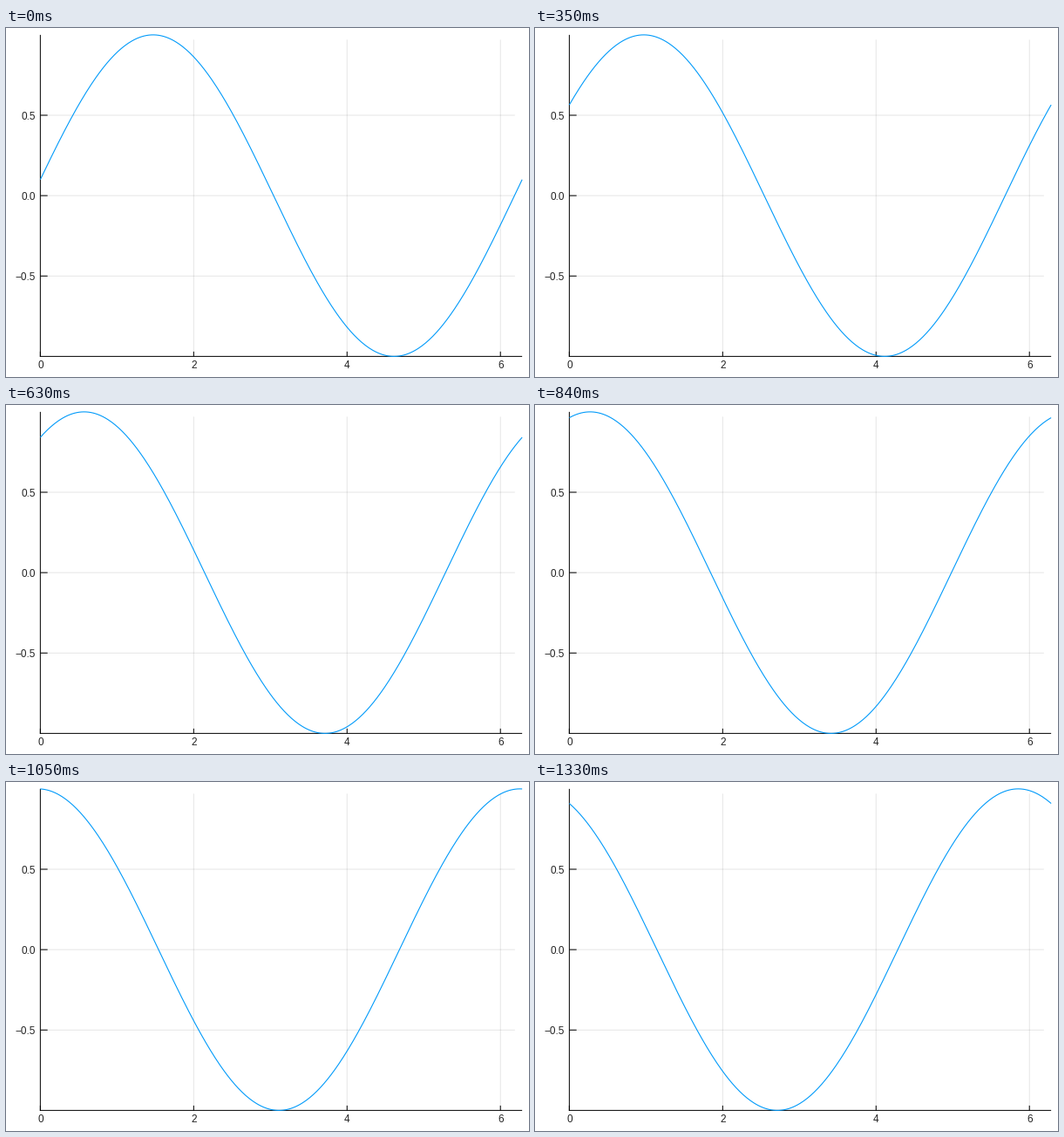
A matplotlib script for the animation above (1.4 s loop, 600 px wide and 400 px high).

```python
import math

import numpy as np
import matplotlib.pyplot as plt
from matplotlib.animation import FuncAnimation

WIDTH, HEIGHT, DPI = 600, 400, 100
PX = 72 / DPI  # points per pixel
LEFT, RIGHT, TOP, BOTTOM = 39.37, 592.13, 7.87, 376.38
TICK_X = 0.015 * (RIGHT - LEFT)
TICK_Y = 0.015 * (BOTTOM - TOP)
FRAMES, INTERVAL = 20, 70

plt.rcParams["font.family"] = "Liberation Sans"

fig = plt.figure(figsize=(WIDTH / DPI, HEIGHT / DPI), dpi=DPI, facecolor="white")
ax = fig.add_axes([0, 0, 1, 1])
ax.set_xlim(0, WIDTH)
ax.set_ylim(HEIGHT, 0)
ax.axis("off")


def to_x(value):
    return LEFT + value / (2 * math.pi) * (RIGHT - LEFT)


def to_y(value):
    return (TOP + BOTTOM) / 2 - value * (BOTTOM - TOP) / 2


def line(xs, ys, color="black", width=1.0, **kw):
    style = dict(color=color, lw=width * PX, snap=False, solid_capstyle="butt")
    return ax.plot(xs, ys, **style, **kw)[0]


def label(x, y, text, align):
    ax.text(x, y, text, ha=align, va="baseline", fontsize=11.8 * PX, color="#222222")


for value in (0, 2, 4, 6):
    x = to_x(value)
    if value:
        line([x, x], [BOTTOM, TOP + TICK_Y], alpha=0.1)
    line([x, x], [BOTTOM, BOTTOM - TICK_Y])
    label(x, 390, str(value), "center")

for value in (-0.5, 0, 0.5):
    y = to_y(value)
    line([LEFT, RIGHT - TICK_X], [y, y], alpha=0.1)
    line([LEFT, LEFT + TICK_X], [y, y])
    label(34, y + 4.9, f"{value:.1f}".replace("-", "\u2212"), "right")

line([LEFT, LEFT], [TOP, BOTTOM + 0.5])
line([LEFT - 0.5, RIGHT], [BOTTOM, BOTTOM])

t = np.linspace(0, 2 * math.pi, 400)
curve = line(to_x(t), to_y(np.sin(t)), "#009afa", 1.1)


def update(frame):
    phase = (frame + 1) / 10
    curve.set_ydata(to_y(np.sin(t + phase)))
    return (curve,)


anim = FuncAnimation(fig, update, frames=FRAMES, interval=INTERVAL,
                     repeat=True, repeat_delay=0, blit=False)
plt.show()
```
